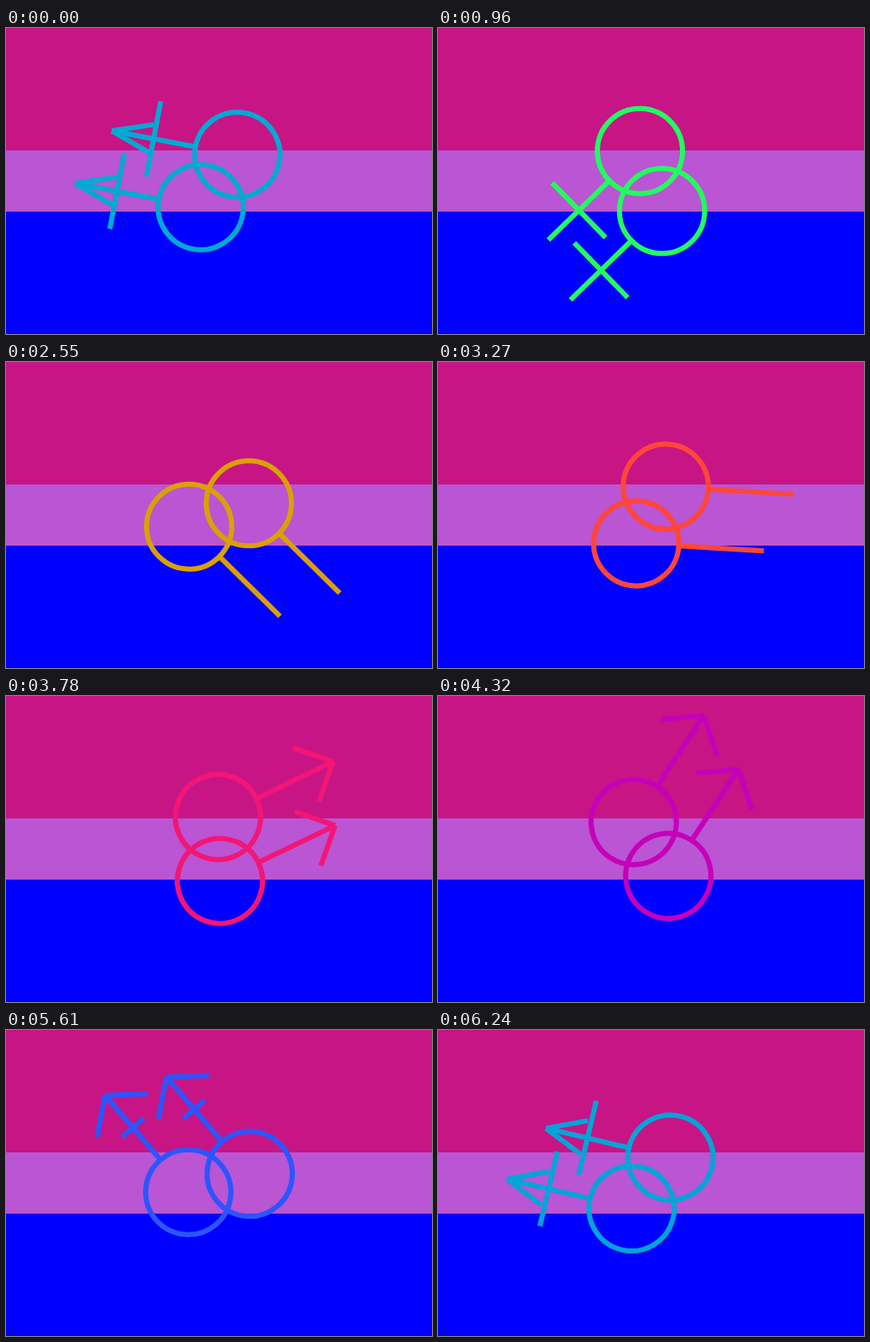
These frames come from a looping animation (500 by 360 pixels, 6270 ms). An HTML page with a canvas:

```html
<!DOCTYPE html>
<html lang="en">
<head>
<meta charset="utf-8">
<title>Turning symbols</title>
<style>
  html, body { margin: 0; width: 100%; height: 100%; overflow: hidden; }
  canvas { display: block; }
</style>
</head>
<body>
<canvas id="stage" width="500" height="360"></canvas>
<script>
const ctx = document.getElementById('stage').getContext('2d');

const STEP_MS = 30, STEPS = 209;
const START = 3.33, TURN = 0.03;        // radians, radians per step
const RADIUS = 50, BAR_AT = 100, TIP = 150;
const ARM = 50, ARM_SPREAD = 0.9, BAR_HALF = 45;
const OFFSET = [-15.3, 34.35];          // symbol centre, along and across the shaft
const THIRD = Math.PI * 2 / 3;

// A sine wave cut to 0..1, so each part grows, holds and shrinks.
const pulse = x => Math.max(0, Math.min(1, 2 * Math.sin(x)));

const channel = x => Math.round(127.5 * (1 + Math.cos(x)));
const rainbow = h => `rgb(${channel(h)},${channel(h - THIRD)},${channel(h + THIRD)})`;

function line(x1, y1, x2, y2) {
  ctx.beginPath();
  ctx.moveTo(x1, y1);
  ctx.lineTo(x2, y2);
  ctx.stroke();
}

function symbol(x, y, spread, bar) {
  ctx.save();
  ctx.translate(x, y);
  ctx.beginPath();
  ctx.arc(0, 0, RADIUS, 0, Math.PI * 2);
  ctx.stroke();
  line(RADIUS, 0, TIP, 0);
  if (bar > 0) line(BAR_AT, -bar, BAR_AT, bar);
  if (spread > 0) {
    for (const side of [-1, 1]) {
      line(TIP, 0, TIP - ARM * Math.cos(spread), side * ARM * Math.sin(spread));
    }
  }
  ctx.restore();
}

function stripe(color, y, h) {
  ctx.fillStyle = color;
  ctx.fillRect(0, y, 500, h);
}

function draw(step) {
  const angle = START - TURN * step;
  const spread = ARM_SPREAD * pulse(-angle);
  const bar = BAR_HALF * pulse(-angle - THIRD);

  stripe('#c71585', 0, 144);
  stripe('#ba55d3', 144, 72);
  stripe('#0000ff', 216, 144);

  ctx.save();
  ctx.translate(250, 180);
  ctx.rotate(angle);
  ctx.lineWidth = 6;
  ctx.strokeStyle = rainbow(angle);
  for (const side of [-1, 1]) {
    symbol(side * OFFSET[0], side * OFFSET[1], spread, bar);
  }
  ctx.restore();
}

function tick() {
  draw(Math.floor(performance.now() / STEP_MS) % STEPS);
  requestAnimationFrame(tick);
}
tick();
</script>
</body>
</html>
```
